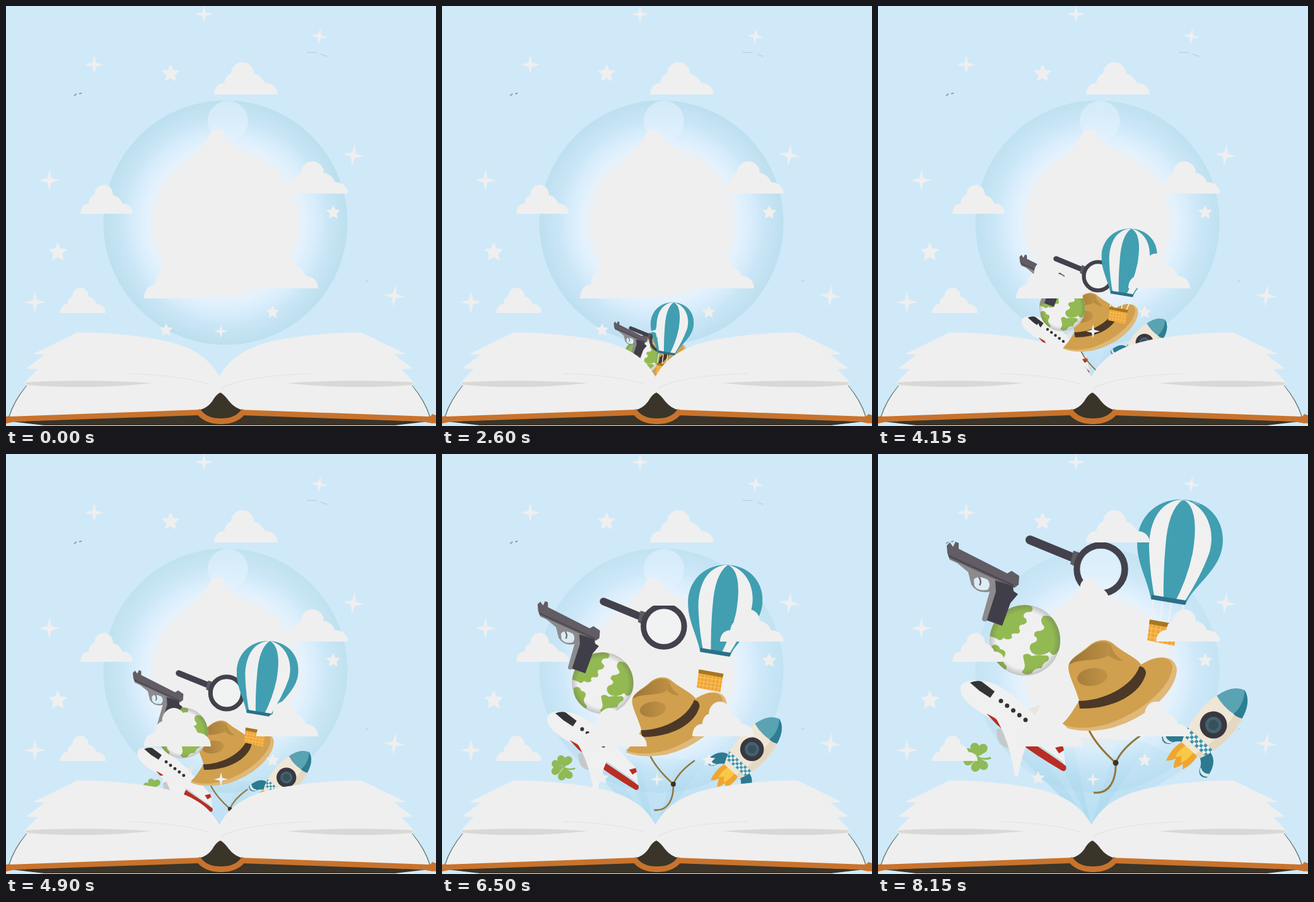
An HTML page that plays this animation: 682x665 px, repeating every 9400 ms.

```html
<!DOCTYPE html>
<html lang="en">
<head>
<meta charset="utf-8">
<title>Open book</title>
<style>
html, body { margin: 0; width: 100%; height: 100%; overflow: hidden; background: #cfe9f9; }
svg { display: block; width: 100%; height: 100%; }
</style>
</head>
<body>
<svg viewBox="0 0 682 665">
<defs>
  <radialGradient id="glow">
    <stop offset="0" stop-color="#efefef"/>
    <stop offset=".57" stop-color="#efefef"/>
    <stop offset=".64" stop-color="#e4f2fd"/>
    <stop offset=".76" stop-color="#d6ecfb"/>
    <stop offset=".84" stop-color="#cae6f6"/>
    <stop offset="1" stop-color="#bcdfee"/>
  </radialGradient>
  <radialGradient id="ball">
    <stop offset=".8" stop-color="#555" stop-opacity="0"/>
    <stop offset="1" stop-color="#555" stop-opacity=".3"/>
  </radialGradient>
  <linearGradient id="fade" x1="0" y1="1" x2="0" y2="0">
    <stop offset="0" stop-color="#9ad0e8" stop-opacity=".4"/>
    <stop offset="1" stop-color="#9ad0e8" stop-opacity="0"/>
  </linearGradient>
  <linearGradient id="crown" x1="0" y1="0" x2="1" y2="0">
    <stop offset="0" stop-color="#9c7535"/>
    <stop offset="1" stop-color="#bd9045"/>
  </linearGradient>
  <clipPath id="disc"><circle cx="233" cy="295" r="56"/></clipPath>
  <clipPath id="envelope"><path d="M482 72C440 71 411 102 411 141C411 174 427 198 433 229L488 238C499 207 547 184 547 136C547 99 519 73 482 72Z"/></clipPath>
  <pattern id="check" width="10" height="10" patternUnits="userSpaceOnUse">
    <path fill="#f0f0f0" d="M0 0h10v10H0z"/><path fill="#3f97aa" d="M0 0h5v5H0zM5 5h5v5H5z"/>
  </pattern>
  <pattern id="weave" width="7" height="7" patternUnits="userSpaceOnUse" patternTransform="rotate(9)">
    <path fill="#f0a532" d="M0 0h7v7H0z"/><path stroke="#f8cc7c" d="M0 2h7M3 0v7"/>
  </pattern>
  <path id="cloud" d="M0 51C0 41 6 33 16 33Q18 20 27 18A18 18 0 0 1 63 18Q76 21 81 33C93 33 101 41 101 51Z"/>
  <path id="leaf" d="M0 0C-4 -6 -15 -8 -13.500 -17C-11 -24 -3 -23 0 -18C3 -23 11 -24 13.500 -17C15 -8 4 -6 0 0Z"/>
  <g id="half">
    <path d="M10 658L303 646L339 640V664H60Z" fill="#3a3429"/>
    <path d="M0 650L6 649L310 638L304 648L15 658L0 661Z" fill="#c8732d"/>
    <path d="M33 601Q12 626 5 650" fill="none" stroke="#6d7a78" stroke-width="1.400"/>
    <path d="M339 588C320 552 287 537 242 528C200 521 150 516 113 517L43 551L61 552L32 574L50 575L29 597L34 600Q14 625 6 650L309 639Q320 636 327 626Q334 614 340 612Z" fill="#efefef"/>
    <path d="M30 596Q120 590 232 597Q130 608 35 600Z" fill="#d8d8d6"/>
    <path d="M193 582Q270 584 320 598" fill="none" stroke="#e2e2e2"/>
  </g>
</defs>

<path d="M0 0H682V665H0Z" fill="#cfe9f9"/>
<circle cx="348" cy="343" r="193.500" fill="url(#glow)"/>
<circle id="haze" cx="348" cy="343" r="175" fill="none" stroke="#cfe9f9" stroke-width="38"/>

<g id="rays" fill="url(#fade)">
  <path d="M338 590L150 405L255 445L420 455L500 490Z"/>
  <path d="M338 590L180 435L235 440ZM338 590L270 450L310 460ZM338 590L380 455L440 445Z"/>
</g>

<g id="rocket"><g transform="translate(532 429) rotate(42)">
  <path d="M-17 49Q-26 68 -18 92Q-12 88 -9 79Q-6 88 -1 93Q4 86 5 78L11 85Q18 65 13 49Z" fill="#f0a52f"/>
  <path d="M-9 49Q-16 66 -11 78Q-7 75 -5 70Q-1 76 2 79Q8 65 5 49Z" fill="#f9c846"/>
  <g id="fin"><path d="M-22 35Q-45 37 -48 69Q-39 78 -31 68Q-29 59 -19 53Z" fill="#2c7a90"/><path d="M-47 62Q-39 69 -30 63L-31 67Q-39 75 -48 67Z" fill="#dbe7e8"/></g>
  <use href="#fin" transform="scale(-1 1)"/>
  <path d="M-27 -39C-35 -10 -32 27 -19 54H19C32 27 35 -10 27 -39Z" fill="#efe6d6"/>
  <path d="M13 -39C20 -5 18 27 9 54H19C32 27 35 -10 27 -39Z" fill="#e4d8c2"/>
  <path d="M-28 30H28L23 45H-23Z" fill="url(#check)"/>
  <path d="M-27 -38Q-20 -68 0 -74Q20 -68 27 -38Q0 -29 -27 -38Z" fill="#5aa3b2"/>
  <path d="M0 -74Q20 -68 27 -38Q20 -34 12 -34Q15 -56 0 -74Z" fill="#2d7e93"/>
  <circle r="21.500" fill="#393840"/><circle r="13" fill="#456270"/><circle r="8" fill="#38505c"/>
</g></g>

<g id="clover" fill="#8fba55"><g transform="translate(158 480)">
  <use href="#leaf" transform="rotate(8)"/><use href="#leaf" transform="rotate(-88)"/><use href="#leaf" transform="rotate(168)"/>
  <path d="M0 0Q10 5 21 1" fill="none" stroke="#8fba55" stroke-width="3"/>
</g></g>

<g id="plane">
  <path d="M232 406L257 397L252 416L243 421Z" fill="#e6e6e2"/>
  <path d="M188 436Q187 462 207 466Q228 464 232 454L212 430Z" fill="#c6c9ca"/>
  <path d="M131 370C132 357 160 355 185 364C212 377 238 401 258 424L294 464L298 499Q235 463 188 424Q150 404 137 388Q130 379 131 370Z" fill="#f0f0f0"/>
  <path d="M172 411Q228 438 298 494Q300 502 293 502Q238 471 188 428Z" fill="#b92d23"/>
  <path d="M178 414Q225 440 292 486L296 492Q226 444 178 414Z" fill="#bcddea"/>
  <path d="M183 412Q208 450 216 505Q218 512 222 511Q227 478 241 447L218 419Z" fill="#f0f0f0"/>
  <path d="M236 419L252 425L272 440L294 462L276 465Z" fill="#f0f0f0"/>
  <path d="M281 465L293 462L295 469L287 474Z" fill="#b92d23"/>
  <path d="M146 362Q156 358 164 360L185 376L178 386L161 375Z" fill="#343436"/>
  <path d="M195 391L234 421" stroke="#343436" stroke-width="7" stroke-linecap="round" stroke-dasharray="0 12.300"/>
</g>

<g id="hat">
  <path d="M335 438Q347 462 377 489Q386 467 416 446M377 489C378 515 368 539 342 536" fill="none" stroke="#92763c" stroke-width="3"/>
  <circle cx="377" cy="489" r="4.500" fill="#3e3024"/>
  <path d="M290 431C300 424 309 407 319 391L415 336C438 317 471 316 474 341C473 380 418 423 365 435Q320 443 290 431Z" fill="#e0b878"/>
  <path d="M291 428C302 419 310 405 319 391L414 336C438 319 463 318 467 336C466 370 414 412 362 428Q322 439 291 428Z" fill="#d0a04e"/>
  <path d="M320 394C314 370 301 350 302 336C304 323 321 316 333 305C347 293 363 291 375 302C391 316 419 326 420 340Q407 390 320 394Z" fill="#d0a04e"/>
  <path d="M303 334C306 322 323 316 335 305Q352 292 369 301Q375 320 352 324C335 328 315 325 303 334Z" fill="url(#crown)"/>
  <path d="M369 301Q373 318 388 327Q378 329 366 319Z" fill="#b88c43"/>
  <ellipse cx="340" cy="353" rx="24" ry="14" fill="url(#crown)" transform="rotate(-8 340 353)" opacity=".8"/>
  <path d="M318 391C356 391 402 370 415 336Q424 337 425 347C417 382 368 405 320 403Z" fill="#4c3827"/>
</g>

<g id="globe">
  <circle cx="233" cy="295" r="56" fill="#f0f0f0"/>
  <g clip-path="url(#disc)" fill="#93ba52">
    <path d="M176 288C180 262 200 238 236 239Q250 241 243 250Q230 249 231 258Q241 265 231 270Q221 270 225 279Q226 286 217 284Q209 284 213 291Q206 296 199 291Q194 298 188 292Z"/>
    <path d="M180 304Q190 298 194 309Q205 311 201 320Q195 328 204 336Q205 344 196 342Q180 325 180 304Z"/>
    <path d="M263 256Q282 254 292 284Q293 306 282 317Q276 320 272 313Q264 319 254 318Q244 318 241 309Q239 300 249 298Q256 293 248 288Q246 280 257 280Q268 277 261 270Q256 262 263 256Z"/>
    <path d="M230 319Q236 313 244 320Q254 317 262 319Q274 317 270 327Q262 330 259 339Q248 338 244 347Q234 352 228 345Q235 338 232 330Z"/>
  </g>
  <circle cx="233" cy="295" r="56" fill="url(#ball)"/>
</g>

<g id="gun">
  <path d="M113 160L216 206L207 217L187 212L172 264Q166 267 165 261L177 218Q158 222 148 207L143 187L126 173L113 167Z" fill="#8b8b8d"/>
  <path d="M152 199Q158 191 174 199Q180 207 174 215Q159 218 153 209Z" fill="#dcecf5"/>
  <path d="M160 195Q165 202 161 208" fill="none" stroke="#6a686e" stroke-width="2.500"/>
  <path d="M109 145L114 140L119 147L123 139L128 141L128 150L205 189L212 185L224 193L223 207L216 212L113 165L110 157Z" fill="#625c65"/>
  <path d="M112 161L215 208" stroke="#4a464e" stroke-width="2"/>
  <path d="M186 200L214 209L215 217L222 222L210 236L197 272L166 261L178 224Z" fill="#403e49"/>
  <path d="M186 200L179 218L165 261L172 265L187 218Z" fill="#8b8b8d"/>
</g>

<g id="lens">
  <path d="M241 136L307 163" stroke="#43414c" stroke-width="14" stroke-linecap="round"/>
  <path d="M310 153L322 157L316 180L305 174Z" fill="#5d5a62"/>
  <circle cx="353.500" cy="182.500" r="38" fill="#f4fafe" fill-opacity=".15" stroke="#43414c" stroke-width="10.500"/>
</g>

<g id="balloon">
  <path d="M437 231L432 265M451 234L447 267M465 236L460 268M486 238L472 270" stroke="#f0f0f0" stroke-width="2.500"/>
  <path d="M431 264L475 272L470 304L427 295Z" fill="url(#weave)"/>
  <path d="M431 262L476 270L474 277L430 269Z" fill="#a8771f"/>
  <g clip-path="url(#envelope)">
    <path d="M405 65H555V245H405Z" fill="#419fb1"/>
    <path d="M482 72C442 75 429 116 430 151Q431 190 440 235L453 237Q452 190 456 146Q460 88 484 72Z" fill="#f0f0f0"/>
    <path d="M484 72C506 83 505 121 499 157Q490 200 469 238L482 240Q512 195 526 155C537 113 515 78 484 72Z" fill="#f0f0f0"/>
  </g>
  <path d="M434 223L489 232L487 239L433 230Z" fill="#2c7088"/>
</g>

<g id="sky" fill="#efefef">
  <circle cx="352" cy="182" r="32" fill="#e6f4ff" fill-opacity=".55"/>
</g>
<path d="M108 142L112 139M116 139L120 138" stroke="#8ba0aa" stroke-width="2"/>
<path d="M477 73L493 74M499 76L510 80M570 436L575 435" stroke="#b3cbd6" fill="none"/>

<g id="book">
  <path d="M0 663H682V665H0Z" fill="#cfe9f9"/>
  <use href="#half"/><use href="#half" transform="translate(677 0) scale(-1 1)"/>
  <path d="M676 646L682 648V661L667 659Z" fill="#c8732d"/>
  <path d="M340 612Q333 615 327 626Q319 637 306 640Q316 657 341 657Q366 657 376 640Q363 637 354 626Q346 615 340 612Z" fill="#3a3429"/>
  <path d="M304 640C312 653 325 657.500 341 657.500S370 653 378 640" fill="none" stroke="#c8732d" stroke-width="9"/>
  <path d="M343 606Q348 601 358 599" fill="none" stroke="#dcdcdc"/>
</g>
</svg>
<script>
const LOOP = 9400, STEP = 50, BRAKE = 7600, END = 8150;
const byId = id => document.getElementById(id);
const sky = byId("sky"), haze = byId("haze");

function add(tag, attrs) {
  const el = document.createElementNS("http://www.w3.org/2000/svg", tag);
  for (const key in attrs) el.setAttribute(key, attrs[key]);
  sky.appendChild(el);
}

// left, top, width, height
[[330, 89, 101, 51], [441, 246, 101, 51], [118, 283, 83, 46], [86, 446, 72, 40],
 [219, 402, 106, 61], [397, 392, 98, 55], [298, 196, 84, 44]].forEach(([x, y, w, h]) =>
  add("use", { href: "#cloud", transform: `translate(${x} ${y}) scale(${w / 101} ${h / 51})` }));

function star(x, y, r, points, inner, turn) {
  const d = Array.from({ length: points * 2 }, (_, i) => {
    const a = i * Math.PI / points - Math.PI / 2 + turn, k = i % 2 ? r * inner : r;
    return `${x + k * Math.cos(a)} ${y + k * Math.sin(a)}`;
  });
  add("path", { d: `M${d.join("L")}Z` });
}
[[314, 13, 14, 0], [497, 48, 13, .15], [140, 93, 15, 0], [69, 276, 17, 0], [551, 236, 17, .15],
 [46, 469, 17, 0], [616, 459, 17, .12], [341, 515, 11, 0]].forEach(([x, y, r, a]) => star(x, y, r, 4, .28, a));
[[261, 107, 15], [519, 327, 12], [82, 390, 16], [254, 513, 11], [423, 485, 11]]
  .forEach(([x, y, r]) => star(x, y, r, 5, .48, 0));

// anchor at rest, anchor at start, starting scale, progress where the rise stops
const items = [
  ["rays", 338, 590, 338, 640, .1, 1],
  ["rocket", 532, 429, 301, 649, .28, 1],
  ["clover", 158, 480, 358, 633, .25, .927],
  ["plane", 298, 501, 376, 673, .24, 1],
  ["hat", 377, 489, 319, 682, .26, 1],
  ["globe", 233, 295, 358, 683, .26, 1],
  ["gun", 109, 139, 353, 677, .2, 1],
  ["lens", 353.5, 182, 344, 701, .14, 1],
  ["balloon", 479, 72, 309, 665, .26, 1]
].map(([id, ...rest]) => [byId(id), ...rest]);

const mix = (a, b, p) => a + (b - a) * p;

// constant speed, then an even slowdown to rest
function progress(t) {
  const span = END - BRAKE, u = Math.min(Math.max(t - BRAKE, 0), span);
  return (Math.min(t, BRAKE) + u - u * u / (2 * span)) / (BRAKE + span / 2);
}

function draw(now) {
  const p = progress(Math.floor(now % LOOP / STEP) * STEP);
  haze.setAttribute("opacity", p * p * .4);
  for (const [el, x, y, x0, y0, s0, stop] of items) {
    const px = mix(x0, x, p), py = mix(y0, y, Math.min(p / stop, 1));
    el.setAttribute("transform", `translate(${px} ${py}) scale(${mix(s0, 1, p)}) translate(${-x} ${-y})`);
  }
}

const start = performance.now();
function tick() {
  draw(performance.now() - start);
  requestAnimationFrame(tick);
}
tick();
</script>
</body>
</html>
```
